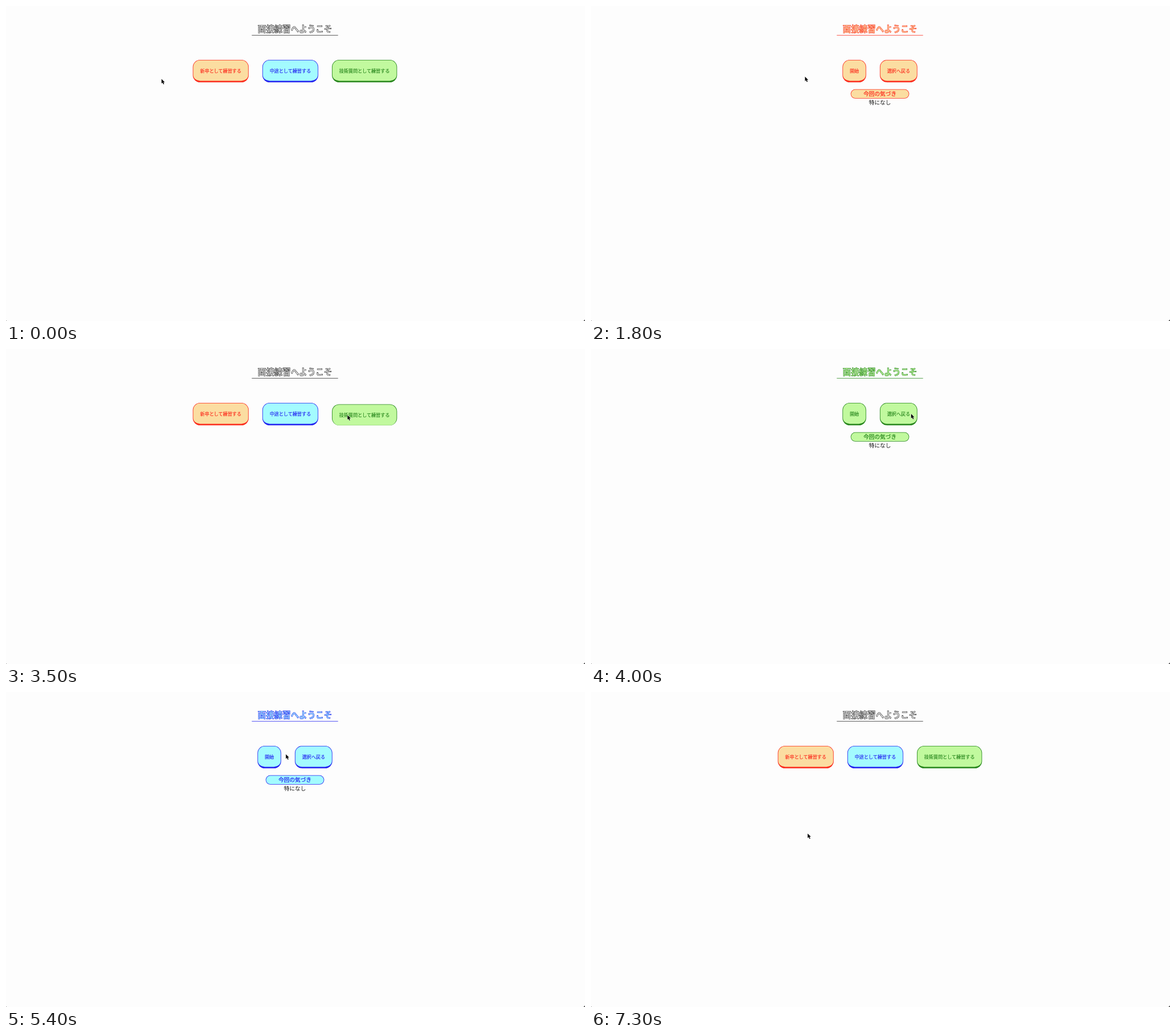
An HTML page that plays this animation: 1000x544 px, repeating every 7400 ms.

```html
<!DOCTYPE html>
<html lang="ja">
<head>
<meta charset="utf-8">
<title>面接練習</title>
<style>
  html, body { margin: 0; width: 100%; height: 100%; overflow: hidden; background: #fdfdfd; }
  svg { display: block; width: 1000px; height: 544px; }
  text { font-family: "Noto Sans CJK JP", "Noto Sans CJK", sans-serif; text-anchor: middle; }
</style>
</head>
<body>
<svg id="stage" viewBox="0 0 1000 544"></svg>
<script>
const LOOP = 7400, STEP = 100, GLIDE = 400;
const CENTER = 499, GAP = 23.6, FONT = 7.95, PADDING = 12.5, BORDER = 0.85;

const THEMES = {
  plain:  { line: "#2a2a2a", fill: "#fdfdfd" },
  orange: { line: "#fb2c1d", fill: "#fbdda1" },
  blue:   { line: "#2222f0", fill: "#a3fbfe" },
  green:  { line: "#27861c", fill: "#c1f99e" },
};

const MENU = [
  ["新卒として練習する", "orange"],
  ["中途として練習する", "blue"],
  ["技術質問として練習する", "green"],
];

// The pointer glides to each stop, presses a button there and opens a page.
const STOPS = [
  { x: 268.6, y: 126, arrive: 0 },
  { x: 369.6, y: 122, arrive: 1400, press: 1700, button: 0, opens: "orange" },
  { x: 537.8, y: 117.3, arrive: 2600, press: 2700, button: 1, opens: "plain" },
  { x: 589.8, y: 114.3, arrive: 3400, press: 3500, button: 2, opens: "green" },
  { x: 546, y: 111.5, arrive: 4100, press: 4200, button: 1, opens: "plain" },
  { x: 483.4, y: 107.5, arrive: 4800, press: 4900, button: 1, opens: "blue" },
  { x: 525, y: 112, arrive: 5800, press: 5800, button: 1, opens: "plain" },
  { x: 374.2, y: 244.4, arrive: 6800 },
];

function label(text, x, centerY, size, color, stroke = 0, outline = color, weight = 500) {
  return `<text x="${x}" y="${centerY + size * 0.38}" font-size="${size}" font-weight="${weight}"
    fill="${color}" stroke="${outline}" stroke-width="${stroke}">${text}</text>`;
}

function box(x, y, w, h, r, color) {
  return `<rect x="${x}" y="${y}" width="${w}" height="${h}" rx="${r}" fill="${color}"/>`;
}

// Rounded face whose lower corners flatten above the thick bottom border.
function face(x, y, w, h, r, lowerR, color) {
  return `<path fill="${color}" d="M${x} ${y + r}a${r} ${r} 0 0 1 ${r} ${-r}h${w - 2 * r}
    a${r} ${r} 0 0 1 ${r} ${r}v${h - r - lowerR}a${r} ${lowerR} 0 0 1 ${-r} ${lowerR}
    h${2 * r - w}a${r} ${lowerR} 0 0 1 ${-r} ${-lowerR}z"/>`;
}

const buttonWidth = text => text.length * FONT + 2 * PADDING;

function button(text, x, { line, fill }, pressed) {
  const y = pressed ? 95.4 : 93, bottom = 131.8, radius = 12.5;
  const base = pressed ? 0 : 2.6, w = buttonWidth(text);
  return box(x, y, w, bottom - y, radius, line)
    + face(x + BORDER, y + BORDER, w - 2 * BORDER, bottom - base - y - BORDER,
      radius - BORDER, radius - base, fill)
    + label(text, x + w / 2, y + 18.5, FONT, line, 0.17);
}

function buttonRow(items, pressed) {
  const total = items.reduce((sum, [text]) => sum + buttonWidth(text) + GAP, -GAP);
  let x = CENTER - total / 2;
  return items.map(([text, theme], i) => {
    const drawn = button(text, x, THEMES[theme], i === pressed);
    x += buttonWidth(text) + GAP;
    return drawn;
  }).join("");
}

function page(name, pressed) {
  const { line, fill } = THEMES[name];
  const title = label("面接練習へようこそ", CENTER, 40, 14.27, fill, 0.65, line, 700)
    + box(CENTER - 74.5, 50.3, 149, 0.75, 0, line);
  if (name === "plain") return title + buttonRow(MENU, pressed);
  return title
    + buttonRow([["開始", name], ["選択へ戻る", name]], pressed)
    + box(CENTER - 50.5, 143.8, 101, 16, 8, line)
    + box(CENTER - 49.7, 144.6, 99.4, 14.4, 7.2, fill)
    + label("今回の気づき", CENTER, 151.8, 9.5, line, 0.25)
    + label("特になし", CENTER, 166.8, 9.5, "#111");
}

function pointer(t) {
  const next = STOPS.findIndex(stop => stop.arrive > t);
  const to = STOPS.at(next), from = next > 0 ? STOPS[next - 1] : to;
  const p = Math.max(0, 1 - (to.arrive - t) / GLIDE);
  const ease = Math.min(1, p * p * (3 - 2 * p));
  const at = axis => from[axis] + (to[axis] - from[axis]) * ease;
  return `<path transform="translate(${at("x")} ${at("y")})" d="M0 0V7.8L1.8 6.2L3.2 9.3L4.6 8.7L3.2 5.7H5.6Z"
    fill="#000" stroke="#fff" stroke-width="0.8" paint-order="stroke"/>`;
}

function scene(t) {
  const last = STOPS.findLast(stop => stop.press < t);
  const click = STOPS.find(stop => stop.press === t);
  return page(last ? last.opens : "plain", click?.button);
}

const corners = `<path d="M0 543V544H1ZM1000 541V544H997Q999.5 543.5 1000 541Z" fill="#222"/>`;
const stage = document.getElementById("stage");
let shown = -1;

function draw() {
  const t = Math.floor(performance.now() % LOOP / STEP) * STEP;
  if (t !== shown) {
    shown = t;
    stage.innerHTML = scene(t) + corners + pointer(t);
  }
  requestAnimationFrame(draw);
}
draw();
</script>
</body>
</html>
```
